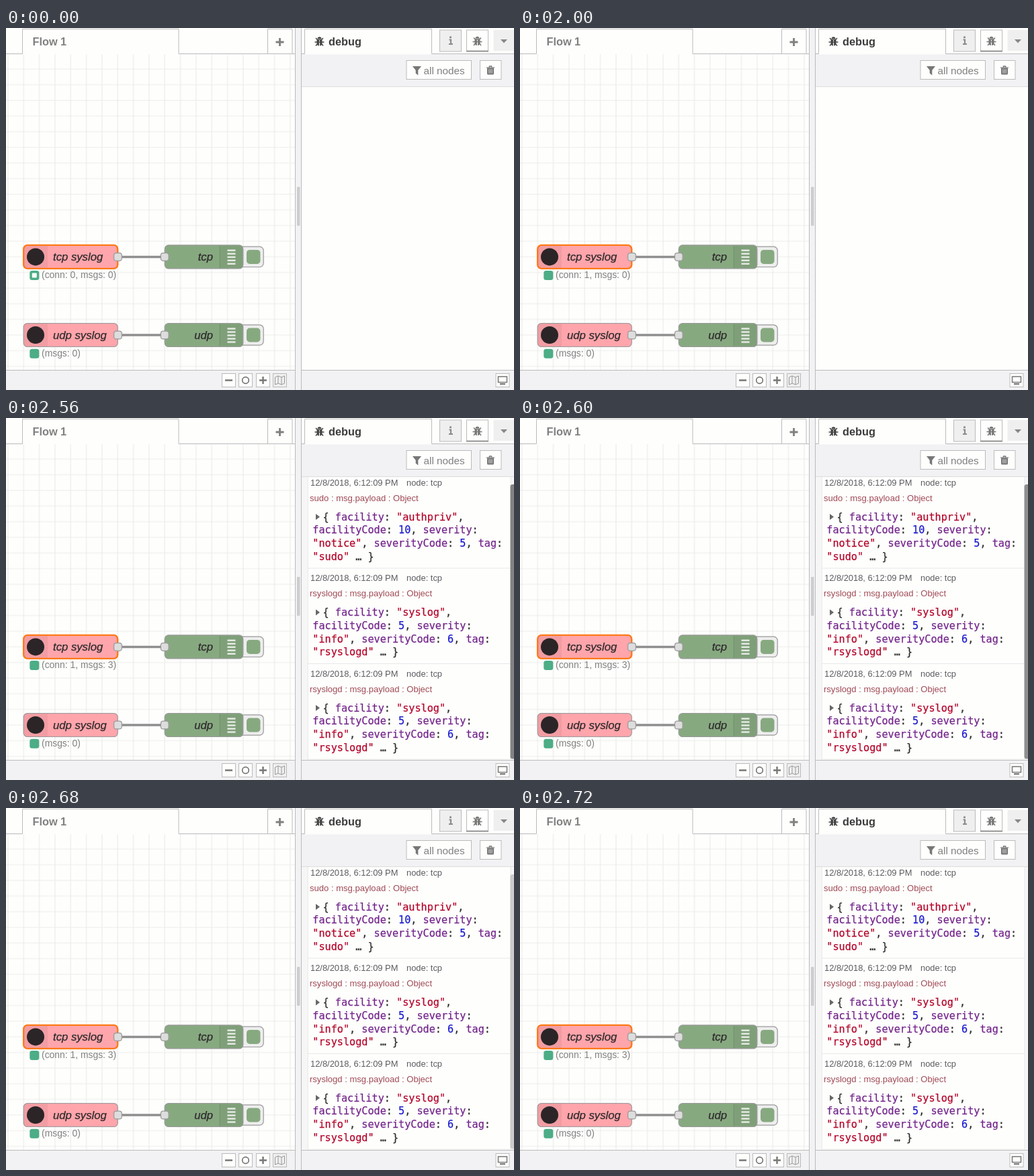
Write an HTML page that moves like this. It is 756 by 540 pixels and loops after 5.52 s.

```html
<!DOCTYPE html>
<html lang="en">
<head>
<meta charset="utf-8">
<title>Syslog flow</title>
<style>
  html, body { margin: 0; width: 100%; height: 100%; overflow: hidden; background: #fefefd; }
  svg { display: block; }
  text { font-family: "Liberation Sans", Arial, sans-serif; white-space: pre; }
  .tab { font-size: 16.3px; font-weight: bold; }
  .label { font-size: 16.7px; font-style: italic; color: #2e2a2c; }
  .status { font-size: 13.9px; fill: #808080; }
  .meta { font-size: 12.9px; fill: #5c5c60; }
  .topic { font-size: 13.05px; fill: #a04a55; }
  .code { font: 15.17px "DejaVu Sans Mono", monospace; color: #2c2c2c; }
  .code, .code tspan, .label { fill: currentColor; stroke: currentColor; stroke-width: .25; }
  .key { color: #74268c; }
  .str { color: #b4082c; }
  .num { color: #1a1acc; }
  .line { fill: none; stroke: #bbb; }
  .btn { fill: #fefefd; stroke: #bbb; }
  .off { fill: #efeff0; }
  .edge { stroke: #999; stroke-width: 1.2; }
</style>
</head>
<body>
<svg width="756" height="540" viewBox="0 0 756 540">
  <defs>
    <pattern id="grid" x="2.9" y="38" width="23.333" height="23.333" patternUnits="userSpaceOnUse">
      <path d="M0 0V23.4M23.333 0V23.4M0 0H23.4M0 23.333H23.4" stroke="#ebebeb" stroke-width="1.2"/>
    </pattern>
    <g id="bug" fill="none" stroke="currentColor" stroke-width="1.5">
      <path d="M-7 1H7M-5.5 -5L-3 -2.5H3L5.5 -5M-5.5 6.5L-3 3.5M5.5 6.5L3 3.5"/>
      <path d="M-4 -2.5H-.6V6.6Q-4 6.2 -4 2ZM4 -2.5H.6V6.6Q4 6.2 4 2ZM-3 -3.8A3 3 0 0 1 3 -3.8Z" fill="currentColor" stroke="none"/>
    </g>
    <clipPath id="list"><rect x="440" y="88" width="316" height="421.5"/></clipPath>
  </defs>

  <!-- workspace -->
  <rect y="39" width="430" height="471" fill="url(#grid)"/>
  <rect width="430" height="38" fill="#fefefd"/>
  <path class="line" d="M0 38.5H24.5V1.5H257V38.5H430M389.5 38V1.5H426V38"/>
  <text class="tab" x="39.5" y="26" fill="#808080">Flow 1</text>
  <path d="M401.5 21H413.5M407.5 15V27" stroke="#808080" stroke-width="2.8"/>
  <g id="nodes"></g>

  <!-- footer -->
  <rect y="510" width="756" height="30" fill="#f2f2f4"/>
  <path class="line" d="M0 510.5H756"/>
  <g id="buttons"></g>
  <g fill="none" stroke="#777" stroke-width="2.4">
    <path d="M326 525.5H337M377 525.5H388M382.5 520V531"/>
    <circle cx="356.5" cy="525.5" r="4.8" stroke-width="1.7"/>
    <path d="M400.5 521L405 519L410 521L414.5 519V530L410 532L405 530L400.5 532ZM405 519V530M410 521V532" stroke="#999" stroke-width="1"/>
    <rect x="732.5" y="520" width="13" height="8.5" stroke-width="1.5"/>
    <path d="M735 531H743" stroke-width="2"/>
  </g>

  <!-- sidebar -->
  <rect x="440" y="38" width="316" height="49" fill="#f2f2f4"/>
  <path class="line" d="M440 87.5H756" style="stroke:#ddd"/>
  <rect x="444.5" y="1.5" width="189" height="38" fill="#fefefd"/>
  <path class="line" d="M440 38.5H444.5V1.5H633.5V38.5H756"/>
  <use href="#bug" x="466.5" y="20" color="#444"/>
  <text class="tab" x="480" y="26" fill="#3c3c3c">debug</text>
  <rect class="btn off" x="645.5" y="3" width="32" height="32"/>
  <path d="M659.5 17.5H662V24M659 24H665" fill="none" stroke="#8c8c8c" stroke-width="2.2"/>
  <rect x="660" y="12.5" width="3" height="2.6" fill="#8c8c8c"/>
  <rect class="btn" x="685.5" y="3" width="32" height="32"/>
  <path d="M685 34.5H718" stroke="#999" stroke-width="2"/>
  <use href="#bug" x="701.5" y="19.5" color="#777"/>
  <rect x="725.5" y="3" width="31" height="31" fill="#efeff0"/>
  <path d="M736 17H746L741 22.5Z" fill="#888"/>
  <rect class="btn" x="596" y="48.5" width="96.5" height="28"/>
  <path d="M605 57H618L613.3 63V70.5L609.7 67.5V63Z" fill="#777"/>
  <text x="621.5" y="68.5" font-size="15.3" fill="#808080">all nodes</text>
  <rect class="btn" x="705.5" y="48.5" width="31.5" height="28"/>
  <path d="M715 59.2H727M718.8 59L719.6 57H722.4L723.2 59" fill="none" stroke="#777" stroke-width="1.3"/>
  <path d="M716 60H726V68Q726 69.5 724.5 69.5H717.5Q716 69.5 716 68Z" fill="#777"/>
  <path d="M718.8 61.5V67.5M721 61.5V67.5M723.2 61.5V67.5" stroke="#ddd" stroke-width=".9"/>
  <g id="messages" clip-path="url(#list)"></g>
  <rect id="bar" x="750.5" y="99" width="9" height="409.5" rx="3.5" fill="#7d7d7d"/>

  <!-- separator -->
  <rect x="430" width="10" height="540" fill="#f2f2f4"/>
  <path class="line" d="M430.5 0V540M439.5 0V540"/>
  <rect x="433" y="237" width="4.5" height="58" rx="1" fill="#cdcdcf"/>
</svg>
<script>
const LOOP = 5520, CONNECT = 2000, ARRIVE = 2080, FADE = 2560, STEP = 40;
const $ = id => document.getElementById(id);

const rect = (x, y, w, h, r, attrs) =>
  `<rect x="${x}" y="${y}" width="${w}" height="${h}" rx="${r}" ${attrs}/>`;
const text = (cls, x, y, content, attrs = '') =>
  `<text class="${cls}" x="${x}" y="${y}" ${attrs}>${content}</text>`;

function flowRow(name, y, selected) {
  const edge = selected ? 'stroke="#ff7a18" stroke-width="2.4"' : 'class="edge"';
  const port = x => rect(x - 5.8, y - 5.8, 11.7, 11.7, 3.5, 'fill="#ddd" class="edge"');
  const top = y - 17.5;
  let bars = '';
  for (let i = 0; i < 5; i++) bars += `M329.5 ${y - 9.6 + i * 5}h12`;
  return `<path d="M166 ${y}H236" stroke="#8f8f8f" stroke-width="3.5"/>`
    + `<path d="M62 ${top}H32q-5.8 0 -5.8 5.8v23.4q0 5.8 5.8 5.8H62Z" fill="#f19da3"/>`
    + `<path d="M62 ${top}h98.4q5.8 0 5.8 5.8v23.4q0 5.8 -5.8 5.8H62Z" fill="#ffa5ab"/>`
    + rect(26.2, top, 140, 35, 5.8, `fill="none" ${edge}`)
    + `<circle cx="44" cy="${y}" r="13" fill="#2b2528"/>`
    + text('label', 70, y + 5.5, name + ' syslog')
    + rect(345.9, y - 15.2, 37.3, 30.3, 5.8, 'fill="#eee" class="edge"')
    + rect(358, y - 10.5, 20.5, 21, 4.7, 'fill="#87a980"')
    + rect(236.2, top, 116.7, 35, 5.8, 'fill="#87a980" class="edge"')
    + `<path d="M318 ${top + 1}h30q4 0 4 4v25q0 4 -4 4h-30Z" fill="#000" fill-opacity=".06"/>`
    + `<path d="M318 ${top + 1}v33" stroke="#000" stroke-opacity=".12"/>`
    + `<path d="${bars}" stroke="#e3eae1" stroke-width="2.5"/>`
    + text('label', 308, y + 5.5, name, 'text-anchor="end"')
    + port(166.4) + port(236.2)
    + rect(35.3, y + 20.7, 14, 14, 3.5, 'fill="#4cad86"')
    + (selected ? rect(38.8, y + 24.2, 7, 7, 1, `id="${name}Hole" fill="#fefefd"`) : '')
    + text('status', 53, y + 32, '(msgs: 0)', `id="${name}Status"`);
}

const paint = code => code.replace(/(\w+)(?=:)|("\w+")|(\d+)/g, (m, key, str) =>
  `<tspan class="${key ? 'key' : str ? 'str' : 'num'}">${m}</tspan>`);

function message([tag, facility, code, level, levelCode], i) {
  const y = 88 + i * 142.5;
  const lines = [`{ facility: "${facility}",`, `facilityCode: ${code}, severity:`,
    `"${level}", severityCode: ${levelCode}, tag:`, `"${tag}" … }`];
  return text('meta', 453, y + 12.7, '12/8/2018, 6:12:09 PM')
    + text('meta', 596, y + 12.7, 'node: tcp')
    + text('topic', 452, y + 35.7, tag + ' : msg.payload : Object')
    + `<path d="M461 ${y + 55}v9l6 -4.5Z" fill="#666"/>`
    + lines.map((l, n) => text('code', n ? 456.3 : 471.6, y + 64.6 + n * 19.7, paint(l))).join('')
    + `<path d="M449 ${y + 136}H751" stroke="#e8e8e8"/>`;
}

$('nodes').innerHTML = flowRow('tcp', 341.4, true) + flowRow('udp', 458, false);
$('buttons').innerHTML = [321.5, 346.5, 372.5, 397.5, 729].map((x, i) =>
  rect(x, 515.5, 20, 20, 0, `class="btn ${i == 3 ? 'off' : ''}"`)).join('');
$('messages').innerHTML =
  '<path d="M440 88h9.3V510h-9.3ZM751 88h5V510h-5Z" fill="#f6f6f6"/><path d="M449.3 88V510M751 88V510" stroke="#e8e8e8"/>'
  + [['sudo', 'authpriv', 10, 'notice', 5],
     ['rsyslogd', 'syslog', 5, 'info', 6],
     ['rsyslogd', 'syslog', 5, 'info', 6]].map(message).join('');

function draw() {
  const t = performance.now() % LOOP;
  const arrived = t >= ARRIVE, connected = t >= CONNECT;
  $('tcpStatus').textContent = `(conn: ${+connected}, msgs: ${arrived ? 3 : 0})`;
  $('tcpHole').style.display = connected ? 'none' : '';
  $('messages').style.display = arrived ? '' : 'none';
  // the scroll bar fades slowly at first
  const faded = Math.min(5, Math.max(0, Math.floor((t - FADE) / STEP) + 1)) / 5;
  $('bar').style.opacity = arrived ? 1 - faded ** 2 : 0;
  requestAnimationFrame(draw);
}
draw();
</script>
</body>
</html>
```
